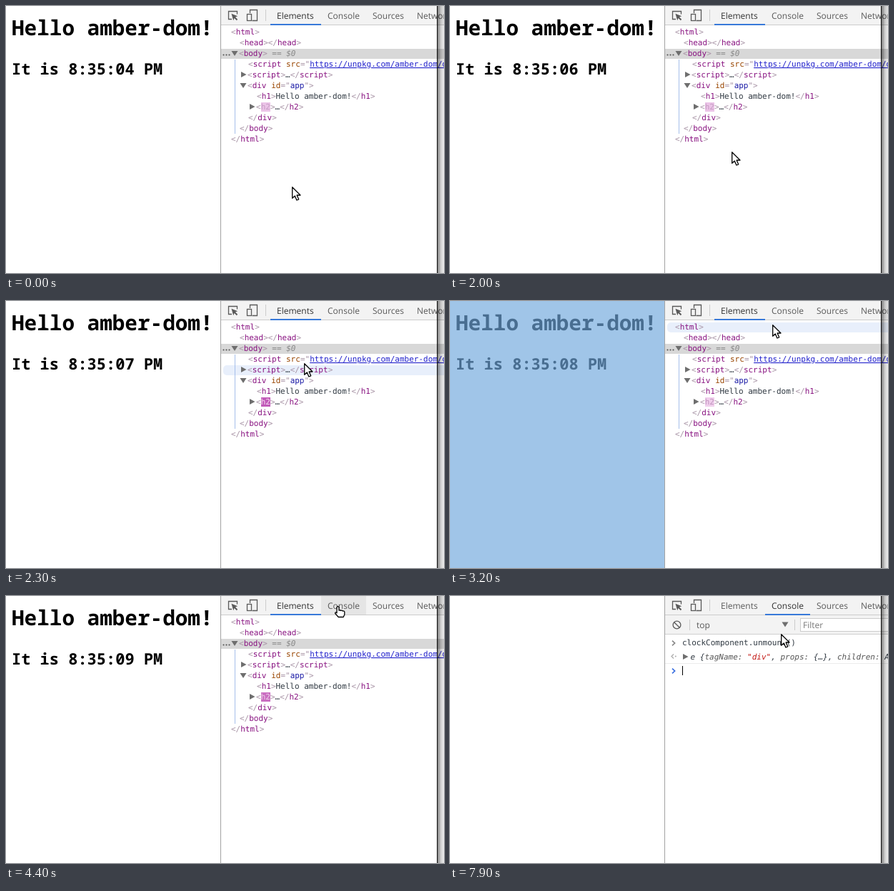
Animation of 613 by 374 pixels, one loop 8 s. Source, as an HTML page:

```html
<!DOCTYPE html>
<html lang="en">
<head>
<meta charset="utf-8">
<title>Clock component demo</title>
<style>
html, body { margin: 0; width: 100%; height: 100%; overflow: hidden; background: #fff; }
svg { display: block; width: 613px; height: 374px; }
text { white-space: pre; text-rendering: geometricPrecision; }
.page { font: bold 29.33px "Noto Sans Mono", monospace; }
.page .small { font-size: 22px; }
.code { font: 11px "DejaVu Sans Mono", monospace; fill: #303942; }
.ui { font: 12px "Open Sans", "Noto Sans", sans-serif; fill: #5a5a5a; }
.p { fill: #a894a6; }
.t { fill: #881280; }
.a { fill: #994500; }
.v { fill: #1a1aa6; }
.link { fill: #2222cc; text-decoration: underline; }
.note { font-style: italic; fill: #888; }
.key { fill: #565656; }
.str { fill: #c41a16; }
.arrow { fill: #6e6e6e; }
.icon { fill: none; stroke: #5a5a5a; stroke-width: 1.3; }
.prompt { fill: none; stroke: #3a6fe0; stroke-width: 1.7; }
.divider { fill: #ccc; }

/* hard changes over the 8 s loop */
.step { animation: 8s step-end infinite; }
.until-console { animation-name: until-console; }
.from-console { animation-name: from-console; }
.until-run { animation-name: until-run; }
.from-run { animation-name: from-run; }
.typed { animation-name: typed; }
.mount { animation-name: mount; }
.unmount { animation-name: unmount; }
.overlay { animation-name: overlay; }
.tab-hover { animation-name: tab-hover; }
.row-hover { animation-name: row-hover; }
.tab-on { animation-name: tab-on; }
.tab-off { animation-name: tab-off; }
.underline { animation-name: underline; }
.caret { animation-name: caret; }
.used { animation-name: used; }
.pointer { animation-name: pointer; }
.arrow-shape { animation-name: arrow-shape; }
.hand-shape { animation-name: hand-shape; }
@keyframes until-console { 0% { opacity: 1 } 56.25%, 100% { opacity: 0 } }
@keyframes from-console { 0% { opacity: 0 } 56.25%, 100% { opacity: 1 } }
@keyframes until-run { 0% { opacity: 1 } 98.75%, 100% { opacity: 0 } }
@keyframes from-run { 0% { opacity: 0 } 98.75%, 100% { opacity: 1 } }
@keyframes typed { 0% { opacity: 0 } 73.75%, 100% { opacity: 1 } }
@keyframes mount { 0% { opacity: 0 } 73.75% { opacity: 1 } 86.25%, 100% { opacity: 0 } }
@keyframes unmount { 0% { opacity: 0 } 86.25%, 100% { opacity: 1 } }
@keyframes overlay { 0% { opacity: 0 } 30% { opacity: 1 } 42.5%, 100% { opacity: 0 } }
@keyframes tab-hover { 0% { opacity: 0 } 42.5% { opacity: 1 } 56.25%, 100% { opacity: 0 } }
@keyframes row-hover {
  0% { opacity: 0; transform: translateY(135px) }
  27.5% { opacity: 1; transform: translateY(105px) }
  28.75% { opacity: 1; transform: translateY(60px) }
  30% { opacity: 1; transform: none }
  42.5%, 100% { opacity: 0; transform: none }
}
@keyframes tab-on { 0% { fill: #5a5a5a } 56.25%, 100% { fill: #333 } }
@keyframes tab-off { 0% { fill: #333 } 56.25%, 100% { fill: #5a5a5a } }
@keyframes underline {
  0% { x: 370px; width: 71px }
  56.25% { x: 418px; width: 66px }
  57.5%, 100% { x: 441px; width: 63px }
}
@keyframes caret {
  0% { opacity: 0; transform: none }
  56.25%, 70% { opacity: 1; transform: none }
  63.75% { opacity: 0; transform: none }
  73.75% { opacity: 1; transform: translateX(232px) }
  80% { opacity: 0; transform: translateX(232px) }
  86.25% { opacity: 1; transform: translateX(159px) }
  93.75% { opacity: 0; transform: translateX(159px) }
  98.75%, 100% { opacity: 1; transform: translateY(39px) }
}
@keyframes used { 0% { stroke: #3a6fe0 } 98.75%, 100% { stroke: #888 } }
@keyframes pointer {
  0% { transform: translate(400px, 253px) }
  23.75% { transform: translate(399px, 240px) }
  25% { transform: translate(394px, 204px) }
  26.25% { transform: translate(398px, 165px) }
  27.5% { transform: translate(408px, 125px) }
  28.75% { transform: translate(417px, 87px) }
  30% { transform: translate(440px, 40px) }
  35% { transform: translate(440px, 40px); animation-timing-function: steps(4) }
  40% { transform: translate(451px, 33px); animation-timing-function: steps(4) }
  45% { transform: translate(458px, 18px); animation-timing-function: steps(8) }
  55% { transform: translate(465px, 14px) }
  61.25% { transform: translate(476px, 12px) }
  62.5% { transform: translate(480px, 30px) }
  63.75% { transform: translate(468px, 48px) }
  65%, 100% { transform: translate(463px, 53px) }
}
@keyframes arrow-shape { 0%, 62.5%, 100% { opacity: 1 } 42.5% { opacity: 0 } }
@keyframes hand-shape { 0%, 62.5%, 100% { opacity: 0 } 42.5% { opacity: 1 } }

/* the updated node flashes once per second */
.flash { animation: flash 1s ease-out -.75s infinite; }
.flash-text { animation: flash-text 1s ease-out -.75s infinite; }
@keyframes flash { from { fill: #be50b4 } to { fill: #f0cfec } }
@keyframes flash-text { from { fill: #fae1f5 } to { fill: #c094be } }
</style>
</head>
<body>
<svg viewBox="0 0 613 374">
  <defs>
    <linearGradient id="shade">
      <stop offset="0" stop-opacity=".5"/>
      <stop offset=".5" stop-opacity=".2"/>
      <stop offset="1" stop-opacity=".06"/>
    </linearGradient>
    <path id="open" d="M0 0h9l-4.5 7z"/>
    <path id="closed" d="M0 0l7.5 4-7.5 4z"/>
    <path id="chevron" d="M0 0l3.6 3.4-3.6 3.4"/>
  </defs>

  <g class="page step until-run">
    <text x="8" y="41">Hello amber-dom!</text>
    <text x="8" y="96" class="small" id="clock">It is 8:35:04 PM</text>
  </g>
  <rect class="step overlay" width="300" height="374" fill="rgba(111,168,220,.66)"/>

  <rect x="300" width="313" height="374" fill="#fff"/>

  <g class="code step until-console">
    <path class="step row-hover" d="M613 30H309a5 5 0 0 0-5 5v4a5 5 0 0 0 5 5h304z" fill="#e8effb"/>
    <rect x="301" y="60" width="312" height="14" fill="#d8d8d8"/>
    <rect x="320" y="75" width="1" height="104" fill="#a5bfea"/>
    <g fill="#555"><circle cx="304.5" cy="68.5" r="1.1"/><circle cx="308.5" cy="68.5" r="1.1"/><circle cx="312.5" cy="68.5" r="1.1"/></g>
    <g class="arrow">
      <use href="#open" x="315.5" y="63"/><use href="#open" x="327.5" y="108"/>
      <use href="#closed" x="329" y="92"/><use href="#closed" x="341" y="137"/>
    </g>
    <rect class="flash" x="357" y="135" width="13" height="13"/>
    <text x="315" y="40" class="p">&lt;<tspan class="t">html</tspan>&gt;</text>
    <text x="327" y="55" class="p">&lt;<tspan class="t">head</tspan>&gt;&lt;/<tspan class="t">head</tspan>&gt;</text>
    <text x="326" y="70" class="p">&lt;<tspan class="t">body</tspan>&gt;<tspan class="note"> == $0</tspan></text>
    <text x="339" y="85" class="p">&lt;<tspan class="t">script</tspan> <tspan class="a">src</tspan>="<tspan class="link">https://unpkg.com/amber-dom/dist</tspan></text>
    <text x="338" y="100" class="p">&lt;<tspan class="t">script</tspan>&gt;<tspan class="code">…</tspan>&lt;/<tspan class="t">script</tspan>&gt;</text>
    <text x="338" y="115" class="p">&lt;<tspan class="t">div</tspan> <tspan class="a">id</tspan>="<tspan class="v">app</tspan>"&gt;</text>
    <text x="351" y="130" class="p">&lt;<tspan class="t">h1</tspan>&gt;<tspan class="code">Hello amber-dom!</tspan>&lt;/<tspan class="t">h1</tspan>&gt;</text>
    <text x="350" y="145" class="p">&lt;<tspan class="flash-text">h2</tspan>&gt;<tspan class="code">…</tspan>&lt;/<tspan class="t">h2</tspan>&gt;</text>
    <text x="339" y="160" class="p">&lt;/<tspan class="t">div</tspan>&gt;</text>
    <text x="327" y="175" class="p">&lt;/<tspan class="t">body</tspan>&gt;</text>
    <text x="315" y="190" class="p">&lt;/<tspan class="t">html</tspan>&gt;</text>
  </g>

  <g class="step from-console">
    <rect x="301" y="27" width="312" height="26" fill="#f3f3f3"/>
    <rect x="301" y="53" width="312" height="1" fill="#d0d0d0"/>
    <g class="icon" stroke-width="1.8"><circle cx="317.5" cy="40.5" r="5.4"/><path d="M313.7 36.7l7.6 7.6"/></g>
    <g class="divider"><rect x="335" y="33" width="1" height="15"/><rect x="482" y="33" width="1" height="15"/></g>
    <path class="arrow" d="M464.5 36.5h9l-4.5 7z"/>
    <rect x="490.5" y="31.5" width="140" height="18" fill="#fff" stroke="#ccc"/>
    <g class="ui"><text x="345" y="45">top</text><text x="494" y="45" fill="#777" style="fill:#777">Filter</text></g>

    <use href="#chevron" x="311" y="62.6" class="prompt step used"/>
    <g class="code">
      <text x="325" y="69" class="step typed">clockComponent.</text>
      <g class="step mount">
        <text x="424.3" y="69">mount(document.body)</text>
        <path d="M457.5 72.5h6.5M550.2 72.5h6.6" stroke="#777"/>
      </g>
      <g class="step unmount">
        <text x="424.3" y="69">unmount()</text>
        <path class="step until-run" d="M470.7 72.5h13.2" stroke="#777"/>
      </g>
      <g class="step from-run">
        <path d="M313 81.5l-3 3 3 3" fill="none" stroke="#aaa" stroke-width="1.2"/>
        <circle cx="315.8" cy="84.5" r="1" fill="#aaa"/>
        <use href="#closed" x="326" y="81" class="arrow"/>
        <text x="336.6" y="89" font-style="italic">e {<tspan class="key">tagName: </tspan><tspan class="str">"div"</tspan>, <tspan class="key">props: </tspan>{…}, <tspan class="key">children: </tspan>Array(2)}</text>
        <rect x="301" y="94" width="312" height="1" fill="#ececec"/>
        <use href="#chevron" x="311" y="101.6" class="prompt"/>
      </g>
    </g>
    <rect class="step caret" x="325" y="59" width="1" height="13"/>
  </g>

  <rect x="301" width="312" height="26" fill="#f3f3f3"/>
  <rect x="301" y="26" width="312" height="1" fill="#ccc"/>
  <rect class="step tab-hover" x="441" width="63" height="26" fill="#e5e5e5"/>
  <rect class="step underline" x="370" y="25" width="71" height="2" fill="#3879d9"/>
  <g class="icon">
    <path d="M316 18.5h-4.5v-11h12v4"/>
    <path d="M341.5 10V5.5h10v15h-7"/>
    <rect x="337.5" y="11.5" width="6" height="9"/>
  </g>
  <path d="M315.5 10.8l8.7 3.4-3.2 1.4 3.2 3.2-1.4 1.4-3.2-3.2-1.4 3.2z" fill="#5a5a5a"/>
  <rect class="divider" x="363" y="5" width="1" height="16"/>
  <g class="ui">
    <text x="379" y="18" class="step tab-off">Elements</text>
    <text x="450" y="18" class="step tab-on">Console</text>
    <text x="513" y="18">Sources</text>
    <text x="575" y="18">Network</text>
  </g>

  <rect x="300" width="1" height="374" fill="#a3a3a3"/>
  <rect x="604" width="9" height="374" fill="url(#shade)"/>
  <rect x="603" width="1" height="374" fill="#111"/>

  <g class="step pointer" fill="#fff" stroke="#000" stroke-width="1.3" stroke-linejoin="round">
    <path class="step arrow-shape" d="M.7.7v15.6l3.6-3.3 2.6 6 2.8-1.2-2.6-5.8h4.9z"/>
    <path class="step hand-shape" d="M-2 1.7q1.5-2 3 0v4.5q1.5-1 2.6.3 1.5-.8 2.6.5 2-.5 2.6 1v4l-1.6 3.5h-7l-4.4-5q-.5-2 1.4-1.5l.8.8z"/>
  </g>
</svg>
<script>
const LOOP = 8000;
const clock = document.getElementById("clock");

function tick(now) {
  const seconds = 4 + Math.floor((now % LOOP + 800) / 1000);
  const label = `It is 8:35:${String(seconds).padStart(2, "0")} PM`;
  if (clock.textContent !== label) clock.textContent = label;
  requestAnimationFrame(tick);
}
requestAnimationFrame(tick);
</script>
</body>
</html>
```
